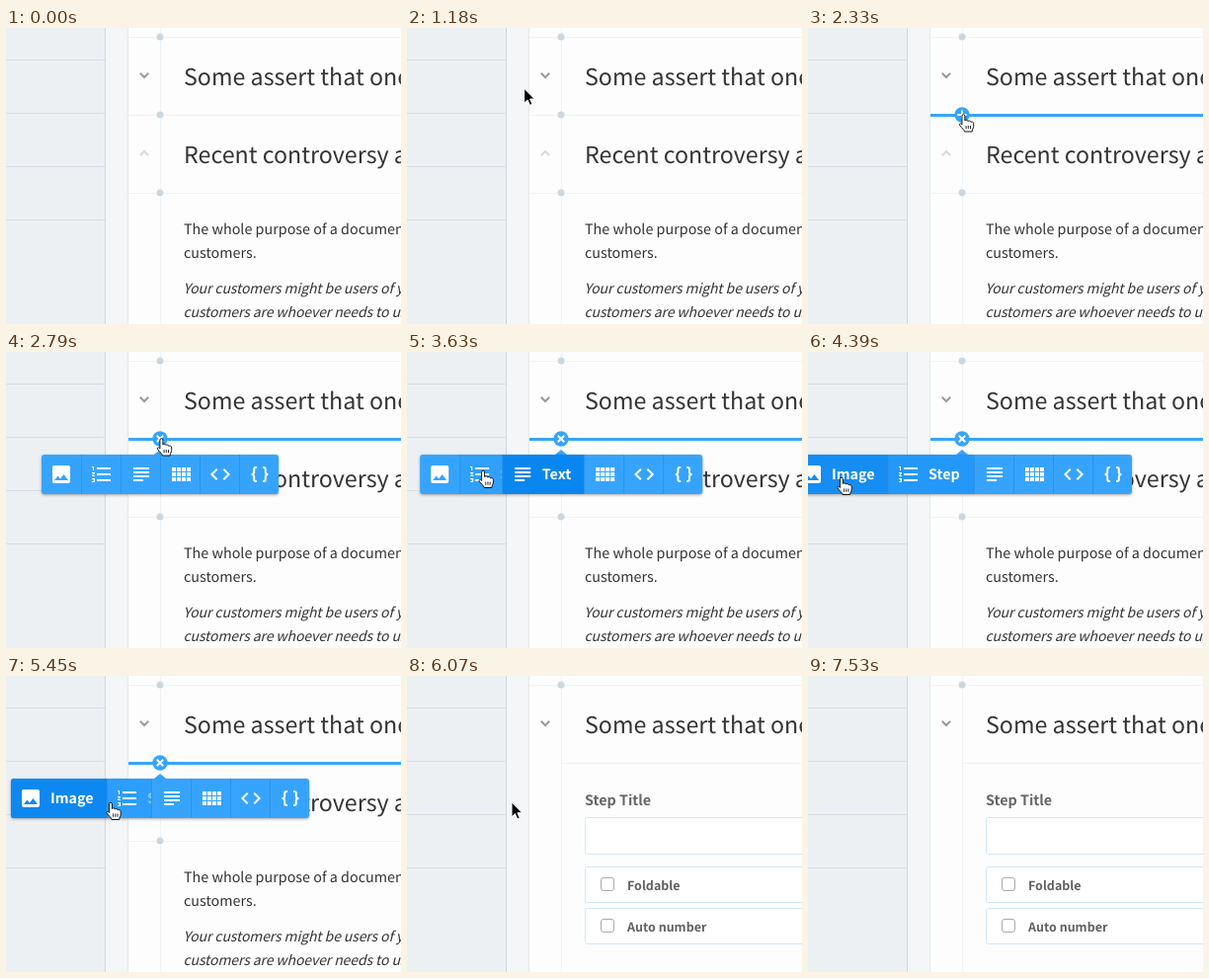
Write an HTML page that moves like this. It is 400x300 px and loops after 8550 ms.

```html
<!DOCTYPE html>
<html lang="en">
<head>
<meta charset="utf-8">
<title>Insert a step</title>
<style>
  html, body { margin: 0; width: 100%; height: 100%; overflow: hidden; background: #fdfdfd; }
  #stage {
    position: absolute; inset: 0; width: 400px; height: 300px; overflow: hidden;
    font-family: "Noto Sans CJK SC", "Noto Sans CJK JP", "Noto Sans CJK", "Open Sans", sans-serif;
    text-rendering: geometricPrecision;
  }
  svg { display: block; }
  #page, #pointer { position: absolute; left: 0; top: 0; }
  .title { font-size: 23.25px; fill: #343434; }
  .body { font-size: 14.35px; fill: #333; }
  .note { font-size: 14px; font-style: italic; letter-spacing: -.1px; fill: #333; }
  .label { font-size: 14.3px; font-weight: 600; fill: #666; }
  .option { font-size: 12.5px; font-weight: 600; fill: #606060; }
  .rule { stroke: #f0f3f5; }
  .dot { fill: #cbd7e0; }
  .field { fill: #fff; stroke: #d0e7f5; }
  .check { fill: #fff; stroke: #a9a9a9; }
  .chevron { fill: none; stroke-width: 2; }
  #bar { position: absolute; left: 156px; top: 104px; transform-origin: 0 0; }
  #bar::before {
    content: ""; position: absolute; left: -6px; top: -5px;
    border: 6px solid transparent; border-top: 0; border-bottom: 5px solid #36a4fd;
  }
  #items {
    display: flex; width: max-content; height: 40px; overflow: hidden; transform: translateX(-50%);
    border-radius: 3px; background: #36a4fd; box-shadow: 0 1px 3px rgba(0, 0, 0, .35);
  }
  .item {
    position: relative; flex: none; height: 40px; overflow: hidden; box-sizing: border-box;
    color: #fff; font-size: 14.3px; font-weight: 600; line-height: 40px; white-space: nowrap;
  }
  .item + .item { border-left: 1px solid #2b93ea; }
  .item svg { position: absolute; left: 8px; top: 8px; }
  .item span { position: absolute; left: 40px; top: 0; }
</style>
</head>
<body>
<div id="stage">
  <svg id="page" width="400" height="300">
    <rect width="101" height="300" fill="#ecf0f3"/>
    <path d="M0 32.5H100M0 86.5H100M0 140.5H100M0 194.5H100" stroke="#d5dee6"/>
    <rect x="101" width="23" height="300" fill="#f4f6f7"/>
    <path d="M100.5 0V300" stroke="#cdd8e1"/>
    <path d="M123.5 0V300" stroke="#e4eaef"/>
    <path class="rule" d="M156.5 0V300M124 9.5H400"/>
    <circle class="dot" cx="156" cy="9" r="3.5"/>
    <path class="chevron" d="M135.8 45.8L140 50L144.2 45.8" stroke="#9a9a9a"/>
    <text class="title" x="180" y="58">Some assert that one</text>

    <g id="article">
      <path class="rule" d="M124 88.5H400M124 167.5H400"/>
      <circle class="dot" cx="156" cy="88" r="3.5"/>
      <circle class="dot" cx="156" cy="167" r="3.5"/>
      <path class="chevron" d="M135.8 129.2L140 125L144.2 129.2" stroke="#dadada"/>
      <text class="title" x="180" y="137">Recent controversy a</text>
      <text class="body" x="180" y="209">The whole purpose of a document</text>
      <text class="body" x="180" y="233">customers.</text>
      <text class="note" x="179.5" y="269">Your customers might be users of your</text>
      <text class="note" x="179.5" y="293">customers are whoever needs to use</text>
    </g>

    <g id="form">
      <path class="rule" d="M156 88.5H400"/>
      <text class="label" x="180" y="131">Step Title</text>
      <rect class="field" x="180.5" y="143.5" width="240" height="37" rx="2"/>
      <rect class="field" x="180.5" y="193.5" width="240" height="36" rx="2"/>
      <rect class="field" x="180.5" y="235.5" width="240" height="36" rx="2"/>
      <rect class="check" x="196.5" y="204.5" width="13" height="13" rx="2.5"/>
      <rect class="check" x="196.5" y="246.5" width="13" height="13" rx="2.5"/>
      <text class="option" x="223" y="217">Foldable</text>
      <text class="option" x="223" y="259">Auto number</text>
    </g>

    <g id="insert">
      <rect x="124" y="87" width="276" height="3" fill="#36a4fd"/>
      <g id="knob">
        <circle r="7.7" fill="#36a4fd"/>
        <path id="plus" d="M-4.6 0H4.6M0 -4.6V4.6" stroke="#fff" stroke-width="1.9"/>
      </g>
    </g>
  </svg>

  <div id="bar"><div id="items"></div></div>

  <svg id="pointer" width="400" height="300">
    <path id="arrow" fill="#000" stroke="#fff" d="M0 0V14.8L3.4 11.6L5.7 17L8.2 16L5.9 10.7H10.6Z"/>
    <g id="hand" fill="#fff" stroke="#111" stroke-linejoin="round">
      <path d="M-1.6 10.5V1.7a1.5 1.5 0 0 1 3 0V6.5C2 5.5 4.3 5.6 4.4 7C5 6.2 7.2 6.4 7.4 7.9C8.2 7.3 10.2 7.6 10.2 9.3V12C10.2 14 8.7 15 8.7 17.5H1C.6 15.5-2 13.8-4 11C-4.8 9.6-3 8.4-1.6 10.5Z"/>
      <path d="M2.6 11.5V14.8M4.8 11.5V14.8M7 11.5V14.8" stroke-width=".9"/>
    </g>
  </svg>
</div>

<script>
const LOOP = 8550;
const $ = id => document.getElementById(id);
const clamp = u => Math.min(1, Math.max(0, u));
const mix = (a, b, u) => a + (b - a) * u;
const span = (t, start, length) => clamp((t - start) / length);
const inOut = u => u < .5 ? 4 * u ** 3 : 1 - 4 * (1 - u) ** 3;
const smooth = u => u * u * (3 - 2 * u);
const show = (node, on) => { node.style.display = on ? "" : "none"; };

let grid = "";
for (let x = 3; x < 20; x += 5)
  for (let y = 5; y < 17; y += 5) grid += `M${x} ${y}h4v4h-4z`;

const brace = "M9 5H8.2Q6.2 5 6.2 7V9.5Q6.2 12 3.6 12Q6.2 12 6.2 14.5V17Q6.2 19 8.2 19H9";
const fill = d => `<path d="${d}" fill="#fff"/>`;
const tools = [
  { label: "Image", extra: 57, icon: fill("M21 19V5c0-1.1-.9-2-2-2H5c-1.1 0-2 .9-2 2v14c0 1.1.9 2 2 2h14c1.1 0 2-.9 2-2zM8.5 13.5l2.5 3 3.5-4.5 4.5 6H5z") },
  { label: "Step", extra: 47, icon: fill("M2 17h2v.5H3v1h1v.5H2v1h3v-4H2zM3 8h1V4H2v1h1zM2 11h1.8L2 13.1v.9h3v-1H3.2L5 10.9V10H2zM7 5h14v2H7zM7 11h14v2H7zM7 17h14v2H7z") },
  { label: "Text", extra: 43, icon: fill("M4 5h16v2H4zM4 9h16v2H4zM4 13h16v2H4zM4 17h10v2H4z") },
  { icon: fill(grid) },
  { icon: fill("M9.4 16.6L4.8 12l4.6-4.6L8 6l-6 6 6 6zM14.6 16.6l4.6-4.6-4.6-4.6L16 6l6 6-6 6z") },
  { icon: `<g fill="none" stroke="#fff" stroke-width="2"><path d="${brace}"/><path d="${brace}" transform="matrix(-1 0 0 1 24 0)"/></g>` }
];
for (const tool of tools) {
  tool.node = document.createElement("div");
  tool.node.className = "item";
  tool.node.innerHTML = `<svg width="24" height="24">${tool.icon}</svg>` +
    (tool.label ? `<span>${tool.label}</span>` : "");
  tool.text = tool.node.querySelector("span");
  $("items").append(tool.node);
}

// Each hover widens its item first, then the previous one closes.
const hovers = [[2950, "Text"], [3550, "Step"], [4180, "Image"], [5360, "Step"]];

function hoverLevel(label, rise, fall) {
  return hovers.reduce((sum, [start, name], k) => {
    if (name !== label) return sum;
    const next = hovers[k + 1];
    return sum + rise(start) - (next ? fall(next[0]) : 0);
  }, 0);
}

const glide = (x, y) => [x, y, smooth, smooth];
const moves = [
  [800, 1650, 157.5, 87.5, u => 1 - (1 - u) ** 2.5, u => u],
  [2790, 2990, ...glide(135, 121)],
  [3370, 3640, ...glide(77, 120)],
  [4080, 4330, ...glide(34, 127)],
  [4800, 5180, ...glide(102, 127.5)],
  [5340, 5430, ...glide(106, 128)],
  [7310, 7530, 160, 304, u => u ** 1.4, u => u ** 1.4]
];

function pointerAt(t) {
  let x = -14, y = 40;
  for (const [start, end, toX, toY, easeX, easeY] of moves) {
    const u = span(t, start, end - start);
    x = mix(x, toX, easeX(u));
    y = mix(y, toY, easeY(u));
  }
  return [x, y];
}

function drawPointer(t) {
  const [x, y] = pointerAt(t);
  const hand = t >= 1560 && t < 6070;
  show($("pointer"), t >= 800 && t < 7530);
  show($("hand"), hand);
  show($("arrow"), !hand);
  for (const id of ["hand", "arrow"])
    $(id).setAttribute("transform", `translate(${x} ${y})`);
}

function drawBar(t) {
  const open = smooth(span(t, 2330, 250));
  show($("bar"), open > 0 && t < 6070);
  $("bar").style.opacity = open;
  $("bar").style.transform = `scale(${mix(.85, 1, open)})`;
  for (const { label, extra = 0, node, text } of tools) {
    const grow = hoverLevel(label,
      s => inOut(span(t, s + 40, 170)),
      s => inOut(span(t, s + 210, 140)));
    const fade = s => smooth(span(t, s, 350));
    const shade = hoverLevel(label, fade, fade);
    node.style.width = 40 + extra * grow + "px";
    node.style.backgroundColor = `rgba(4, 130, 238, ${clamp(shade)})`;
    if (text) text.style.opacity = .4 + .6 * grow;
  }
}

function drawPage(t) {
  const done = t >= 6070;
  const appear = smooth(span(t, 1660, 200));
  show($("article"), !done);
  show($("form"), done);
  show($("insert"), !done && appear > 0);
  $("insert").setAttribute("opacity", appear);
  $("knob").setAttribute("transform", `translate(156 88) scale(${mix(.45, 1, appear)})`);
  $("plus").setAttribute("transform", `rotate(${45 * smooth(span(t, 2330, 250))})`);
}

const began = performance.now();
function frame() {
  const t = (performance.now() - began) % LOOP;
  drawPage(t);
  drawBar(t);
  drawPointer(t);
  requestAnimationFrame(frame);
}
frame();
</script>
</body>
</html>
```
